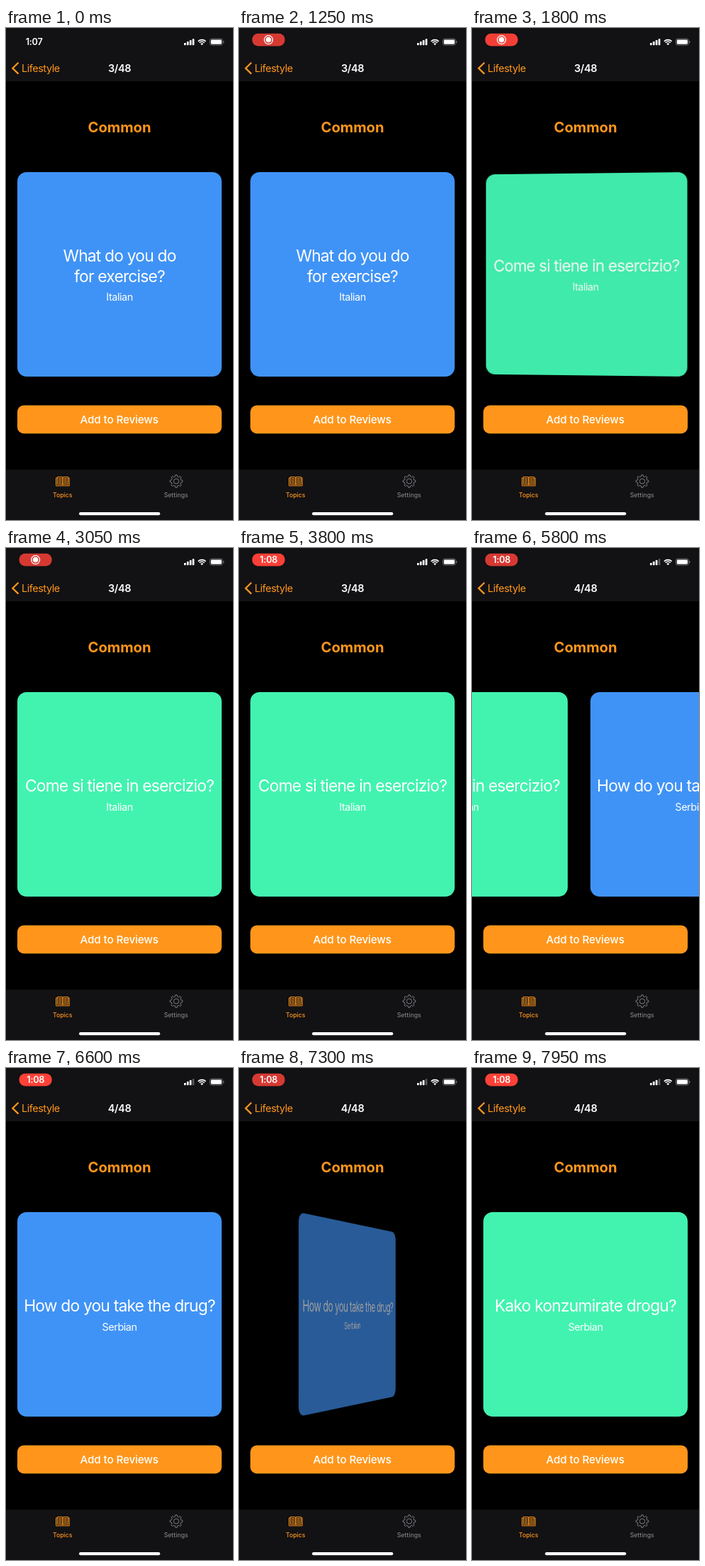
An HTML page with a canvas for the animation above (8000 ms loop, 320x693 px).

```html
<!DOCTYPE html>
<html lang="en">
<head>
<meta charset="utf-8">
<title>Phrase cards</title>
<style>
  html, body { margin: 0; width: 100%; height: 100%; overflow: hidden; background: #000; }
  #stage { position: relative; width: 320px; height: 693px; overflow: hidden;
    font-family: Inter, Roboto, sans-serif; color: #fff; }
  canvas { position: absolute; left: 0; top: 0; width: 320px; height: 693px; }
  .label { position: absolute; white-space: nowrap; line-height: 20px; transform: translate(-50%, -50%); }
  .card { position: absolute; left: 16px; top: 202.6px; width: 288px; height: 288px; border-radius: 13px;
    display: flex; flex-direction: column; align-items: center; justify-content: center; gap: 6.8px; }
  .title { font-size: 22.8px; font-weight: 400; line-height: 29px; letter-spacing: -0.035em;
    text-align: center; white-space: pre; }
  .lang { font-size: 14.4px; line-height: 17.3px; letter-spacing: -0.03em; }
  #back { left: 22px; top: 56.5px; transform: translateY(-50%); font-size: 14.5px; letter-spacing: -0.033em; color: #ff961b; }
  #count { left: 160px; top: 56.5px; font-size: 14.5px; font-weight: 600; letter-spacing: -0.025em; }
  #heading { left: 160px; top: 139.6px; font-size: 20.2px; font-weight: 700; color: #ff961b; }
  #action { left: 159.7px; top: 552px; font-size: 15.2px; font-weight: 500; letter-spacing: -0.007em; }
  #clock { font-size: 12.7px; font-weight: 600; letter-spacing: -0.02em; }
  .tab { font-size: 8.7px; font-weight: 500; top: 657.5px; }
</style>
</head>
<body>
<div id="stage">
  <canvas id="view"></canvas>
  <div class="label" id="clock"></div>
  <div class="label" id="back">Lifestyle</div>
  <div class="label" id="count"></div>
  <div class="label" id="heading">Common</div>
  <div class="card" id="first"><div class="title"></div><div class="lang">Italian</div></div>
  <div class="card" id="second"><div class="title"></div><div class="lang">Serbian</div></div>
  <div class="label" id="action"></div>
  <div class="label tab" style="left:79.7px;color:#ff961b">Topics</div>
  <div class="label tab" style="left:239.7px;color:#7e7d82">Settings</div>
</div>
<script>
const LOOP = 8000;
const ORANGE = '#ff961b', RED = '#f75645', BLUE = '#4093f6', GREEN = '#42f3b0';
const BAR = '#121114', GRAY = '#7e7d82';
const FLIP_TIME = 500;
const PILL_IN = 300, CLOCK_BACK = 3700, SAVED = 3900;
const SLIDE_START = 5500, SLIDE_END = 6080, SIGNAL_DROP = 5800;
// Alternating peaks and troughs of the recording pill's glow.
const PULSE = [300, 1200, 2100, 3050, 3700, 4200, 4950, 5800, 6600, 7275, 7950, 8600];

const $ = id => document.getElementById(id);
const canvas = $('view'), ctx = canvas.getContext('2d');
const ratio = Math.max(1, window.devicePixelRatio || 1);
canvas.width = 320 * ratio;
canvas.height = 693 * ratio;

const cards = [
  { el: $('first'), front: 'What do you do\nfor exercise?', back: 'Come si tiene in esercizio?', flip: 1357 },
  { el: $('second'), front: 'How do you take the drug?', back: 'Kako konzumirate drogu?', flip: 7100 }
];

const clamp = v => Math.min(1, Math.max(0, v));
const progress = (t, start, end) => clamp((t - start) / (end - start));
const easeInOut = p => p < 0.5 ? 2 * p * p : 1 - 2 * (1 - p) * (1 - p);
const easeSlide = p => p * p * (3 - 2 * p);

function setText(el, text) {
  if (el.textContent !== text) el.textContent = text;
}

function box(x, y, w, h, r, color) {
  ctx.fillStyle = color;
  ctx.beginPath();
  ctx.roundRect(x, y, w, h, r);
  ctx.fill();
}

function line(points, color, width, close) {
  ctx.strokeStyle = color;
  ctx.lineWidth = width;
  ctx.beginPath();
  points.forEach(([x, y]) => ctx.lineTo(x, y));
  if (close) ctx.closePath();
  ctx.stroke();
}

function ring(x, y, r, color, width) {
  ctx.strokeStyle = color;
  ctx.lineWidth = width;
  ctx.beginPath();
  ctx.arc(x, y, r, 0, Math.PI * 2);
  ctx.stroke();
}

function disc(x, y, r, color) {
  ctx.fillStyle = color;
  ctx.beginPath();
  ctx.arc(x, y, r, 0, Math.PI * 2);
  ctx.fill();
}

function pulse(t) {
  let i = 0;
  while (i < PULSE.length - 2 && t >= PULSE[i + 1]) i++;
  const wave = (1 + Math.cos(Math.PI * progress(t, PULSE[i], PULSE[i + 1]))) / 2;
  return i % 2 ? 1 - wave : wave;
}

function drawPill(t) {
  const glow = pulse(t);
  const mix = (a, b) => Math.round(a + (b - a) * glow);
  ctx.globalAlpha = progress(t, PILL_IN, PILL_IN + 250);
  box(18.5, 7.8, 46.2, 17.6, 8.4, `rgb(${mix(214, 255)},${mix(57, 65)},${mix(50, 55)})`);
  if (t < CLOCK_BACK) {
    ring(41.6, 16.6, 6, '#fff', 1.3);
    disc(41.6, 16.6, 3.8, '#fff');
  }
  ctx.globalAlpha = 1;
}

function drawStatus(t) {
  for (let i = 0; i < 4; i++) {
    const h = 3.4 + i * 1.9;
    const lit = i < 3 || t < SIGNAL_DROP;
    box(251 + i * 3.9, 24.3 - h, 2.7, h, 0.7, lit ? '#fff' : '#59585b');
  }
  const cx = 276.2, cy = 24.2, from = -Math.PI * 0.75, to = -Math.PI * 0.25;
  ctx.strokeStyle = '#fff';
  ctx.lineWidth = 1.6;
  for (const r of [7.6, 4.9]) {
    ctx.beginPath();
    ctx.arc(cx, cy, r, from, to);
    ctx.stroke();
  }
  ctx.fillStyle = '#fff';
  ctx.beginPath();
  ctx.moveTo(cx, cy);
  ctx.arc(cx, cy, 2.8, from, to);
  ctx.fill();

  ctx.strokeStyle = '#77767a';
  ctx.lineWidth = 0.9;
  ctx.beginPath();
  ctx.roundRect(287.4, 15.2, 18, 8.9, 2.6);
  ctx.stroke();
  box(288.8, 16.6, 15.2, 6.1, 1.4, '#fff');
  box(306.3, 18.2, 1.1, 3, 0.6, '#77767a');
}

function drawBook() {
  for (const side of [-1, 1]) {
    const at = (x, y) => [79.9 + side * x, y];
    line([at(0, 633), at(1, 632.4), at(7.5, 632.4), at(7.5, 642.6), at(1, 642.6), at(0, 643.2)], ORANGE, 1, true);
    line([at(7.5, 633.8), at(9.3, 633.8), at(9.3, 644.8), at(0, 644.8)], ORANGE, 1);
    for (let y = 634.5; y < 642; y += 2) line([at(1.5, y), at(6.2, y)], ORANGE, 1);
  }
}

function drawGear() {
  const cx = 240, cy = 638.4, teeth = 8, points = [];
  for (let i = 0; i < teeth; i++) {
    for (const [shift, r] of [[-0.29, 6.9], [-0.17, 8.9], [0.17, 8.9], [0.29, 6.9]]) {
      const a = (i + shift) / teeth * Math.PI * 2;
      points.push([cx + r * Math.sin(a), cy - r * Math.cos(a)]);
    }
  }
  line(points, GRAY, 1, true);
  ring(cx, cy, 3.6, GRAY, 1);
}

function drawCard(card, t, shift) {
  const p = easeInOut(progress(t, card.flip, card.flip + FLIP_TIME));
  const turned = p >= 0.5;
  const angle = Math.PI * (turned ? p - 1 : p);
  const depth = Math.abs(Math.sin(angle));
  const style = card.el.style;
  style.visibility = Math.abs(shift) < 320 ? 'visible' : 'hidden';
  style.background = turned ? GREEN : BLUE;
  style.filter = depth > 0.001 ? `brightness(${1 - 0.45 * depth})` : 'none';
  // The card backs away while turning, so its near edge stays on the screen plane.
  style.transform = depth > 0.001
    ? `perspective(980px) translateZ(${-144 * depth}px) rotateY(${angle}rad)`
    : shift ? `translateX(${shift}px)` : 'none';
  setText(card.el.firstChild, turned ? card.back : card.front);
}

function render(t) {
  ctx.setTransform(ratio, 0, 0, ratio, 0, 0);
  ctx.fillStyle = '#000';
  ctx.fillRect(0, 0, 320, 693);
  ctx.fillStyle = BAR;
  ctx.fillRect(0, 0, 320, 75);
  ctx.fillRect(0, 622, 320, 71);

  drawPill(t);
  drawStatus(t);
  line([[17.5, 48.8], [9.4, 56.7], [17.5, 64.6]], ORANGE, 2.3);

  const slide = easeSlide(progress(t, SLIDE_START, SLIDE_END));
  const next = slide >= 0.5;
  const saved = t >= SAVED && !next;
  box(16, 531.6, 288, 39.6, 9, saved ? RED : ORANGE);
  drawBook();
  drawGear();
  box(103, 682, 114.3, 4.3, 2.15, '#fff');

  const clock = $('clock');
  const early = t < PILL_IN;
  setText(clock, early ? '1:07' : t >= CLOCK_BACK ? '1:08' : '');
  clock.style.left = early ? '39.6px' : '41.8px';
  clock.style.top = early ? '19.8px' : '16.6px';
  setText($('count'), next ? '4/48' : '3/48');
  setText($('action'), saved ? 'Remove from Reviews' : 'Add to Reviews');

  drawCard(cards[0], t, -320 * slide);
  drawCard(cards[1], t, 320 * (1 - slide));
}

const begin = performance.now();
function tick() {
  render((performance.now() - begin) % LOOP);
  requestAnimationFrame(tick);
}
tick();
</script>
</body>
</html>
```
